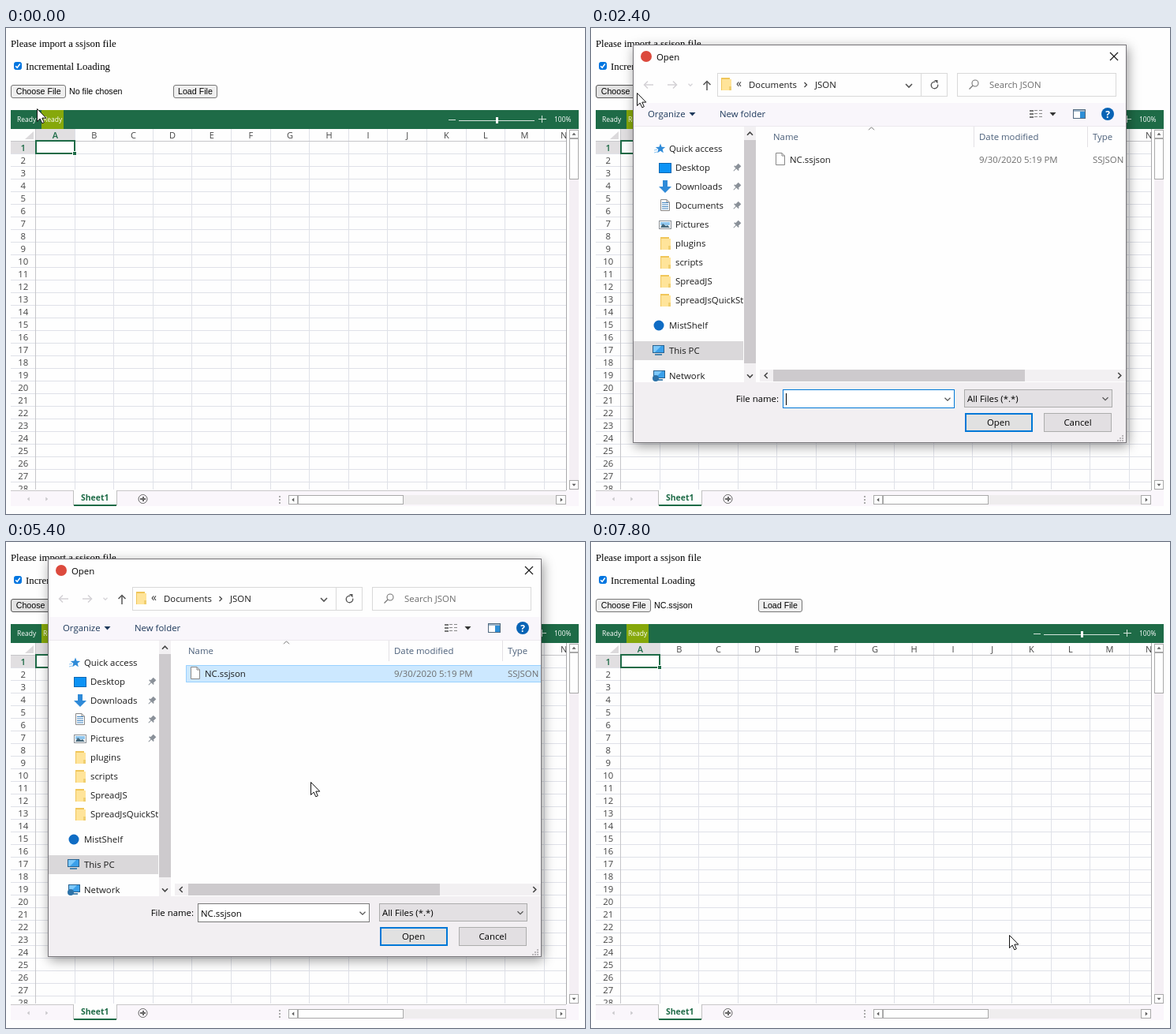
Animation of 734 by 616 pixels, one loop 8000 ms. Source, as an HTML page with a canvas:

```html
<!DOCTYPE html>
<html lang="en">
<head>
<meta charset="utf-8">
<title>Import a file</title>
<style>
html, body { margin: 0; width: 100%; height: 100%; overflow: hidden; background: #fefefe; }
canvas { display: block; }
</style>
</head>
<body>
<canvas id="stage" width="734" height="616"></canvas>
<script>
const ctx = document.getElementById('stage').getContext('2d');
const LOOP = 8000, STEP = 200;
const UI = '"Open Sans", "Noto Sans", sans-serif';
const ARIAL = '10.67px "Liberation Sans", Arial, sans-serif';
const SERIF = '12.8px "Liberation Serif", "Times New Roman", serif';
const GREEN = '#1e6b47', BLUE = '#0078d7';

// [time, x, y] of the pointer tip
const PATH = [
  [0, 39, 102], [200, 50, 91], [400, 57, 83], [1000, 57, 83], [1400, 58, 82],
  [2600, 58, 82], [3000, 118, 104], [3400, 222, 134], [3600, 247, 139],
  [4000, 264, 165], [4600, 265, 166], [5000, 318, 226], [5400, 386, 304],
  [5800, 456, 396], [6200, 530, 494], [6400, 538, 504], [7400, 538, 504], [7800, 530, 498]
];

function pointerAt(t) {
  const i = PATH.findIndex(p => p[0] > t);
  if (i < 0) return PATH[PATH.length - 1].slice(1);
  const [t0, x0, y0] = PATH[i - 1], [t1, x1, y1] = PATH[i];
  const k = (t - t0) / (t1 - t0);
  return [x0 + (x1 - x0) * k, y0 + (y1 - y0) * k];
}

const inside = ([x, y], l, t, r, b) => x >= l && x < r && y >= t && y < b;

function rect(x, y, w, h, fill, stroke, lw = 1) {
  if (fill) { ctx.fillStyle = fill; ctx.fillRect(x, y, w, h); }
  if (stroke) {
    ctx.strokeStyle = stroke; ctx.lineWidth = lw;
    ctx.strokeRect(x + lw / 2, y + lw / 2, w - lw, h - lw);
  }
}

function round(x, y, w, h, r, fill, stroke) {
  ctx.beginPath();
  ctx.roundRect(x + .5, y + .5, w - 1, h - 1, r);
  ctx.fillStyle = fill; ctx.fill();
  if (stroke) { ctx.strokeStyle = stroke; ctx.lineWidth = 1; ctx.stroke(); }
}

function disc(x, y, r, fill) {
  ctx.beginPath(); ctx.arc(x, y, r, 0, 7);
  ctx.fillStyle = fill; ctx.fill();
}

function trace(pts) {
  ctx.beginPath();
  for (let i = 0; i < pts.length; i += 2) ctx.lineTo(pts[i], pts[i + 1]);
}

function line(color, lw, ...pts) {
  trace(pts);
  ctx.strokeStyle = color; ctx.lineWidth = lw; ctx.stroke();
}

function poly(color, ...pts) {
  trace(pts); ctx.closePath();
  ctx.fillStyle = color; ctx.fill();
}

function text(s, x, y, color = '#1a1a1a', font = 11.4, align = 'left') {
  ctx.font = typeof font === 'number' ? `${font}px ${UI}` : font;
  ctx.fillStyle = color; ctx.textAlign = align;
  ctx.fillText(s, x, y);
}

// direction: 0 down, 1 left, 2 up, 3 right
function turned(x, y, dir, draw) {
  ctx.save(); ctx.translate(x, y); ctx.rotate(dir * Math.PI / 2); draw(); ctx.restore();
}
const chevron = (x, y, dir = 0, c = '#555', r = 4, lw = 1.3) =>
  turned(x, y, dir, () => line(c, lw, -r, -r / 2, 0, r / 2, r, -r / 2));
const wedge = (x, y, dir, c, r = 3) =>
  turned(x, y, dir, () => poly(c, -r, -r / 2, r, -r / 2, 0, r / 2 + .5));
const arrow = (x, y, dir, c) => turned(x, y, dir, () => {
  line(c, 1.5, 0, -6, 0, 5);
  line(c, 1.5, -4.5, 1, 0, 5.5, 4.5, 1);
});

function clipped(x, y, w, h, draw) {
  ctx.save(); ctx.beginPath(); ctx.rect(x, y, w, h); ctx.clip(); draw(); ctx.restore();
}

function form(t, at, open) {
  text('Please import a ssjson file', 6, 24, '#000', SERIF);
  round(10, 43, 10, 10, 2, '#0075e0', '#0075e0');
  line('#fff', 1.6, 12.2, 48.2, 14.2, 50.2, 17.8, 45.6);
  text('Incremental Loading', 25, 53, '#000', SERIF);
  const hot = open || inside(at, 6, 72, 76, 89);
  round(6, 72, 70, 17, 2.5, hot ? '#e3e3e3' : '#efefef', hot ? '#555' : '#767676');
  text('Choose File', 12.7, 84, '#000', ARIAL);
  text(t >= 6800 ? 'NC.ssjson' : 'No file chosen', 80, 84, '#000', ARIAL);
  round(212, 72, 56, 17, 2.5, '#efefef', '#767676');
  text('Load File', 218, 84, '#000', ARIAL);
}

function statusBar() {
  rect(6, 104, 720, 24, GREEN);
  rect(45, 104, 28, 24, '#86a80b');
  text('Ready', 14, 119, '#fff', 8.5);
  text('Ready', 47, 119, '#fff', 8.5);
  rect(561, 116, 9, 1, '#d5e5dc');
  rect(574, 117, 96, 1, '#d5e5dc');
  rect(621, 113, 3, 8, '#fff');
  rect(675, 115, 10, 1, '#d5e5dc');
  rect(679, 111, 1, 9, '#d5e5dc');
  text('100%', 695, 119, '#fff', 8.5);
}

function grid() {
  const line1 = '#dfe1e8';
  rect(6, 144, 31, 15, '#e1dfe1');
  rect(38, 128, 50, 15, '#e1dfe1');
  clipped(6, 128, 704, 457, () => {
    for (let i = 0; i < 14; i++) {
      const x = 37.5 + 49.6 * i;
      if (i) rect(Math.floor(x), 128, 1, 457, line1);
      text(String.fromCharCode(65 + i), x + 24.8, 140, i ? '#444' : GREEN,
        i ? 11 : `600 11px ${UI}`, 'center');
    }
    for (let i = 0; i < 28; i++) {
      rect(6, 159 + 16 * i, 704, 1, line1);
      text(i + 1, 21.8, 156 + 16 * i, i ? '#444' : GREEN, i ? 11.4 : `600 11.4px ${UI}`, 'center');
    }
  });
  rect(6, 143, 704, 1, '#c6c6c9');
  rect(37, 128, 1, 457, '#c6c6c9');
  poly('#dcdadc', 35, 131, 35, 141, 24, 141);
  rect(37, 142, 51, 18, '#fff', GREEN, 2);
  rect(84, 156, 6, 6, '#fff');
  rect(85, 157, 4, 4, GREEN);
  rect(710, 128, 1, 458, '#a9a9ab');
}

function scrollers() {
  const edge = '#a9a9a9', ink = '#606060';
  rect(714, 128, 12, 458, '#f4eff4');
  rect(714, 129, 12, 11, '#fefefe', edge);
  wedge(720, 134.5, 2, ink, 2.5);
  rect(714, 140, 12, 52, '#fefefe', edge);
  rect(714, 573, 12, 12, '#fefefe', edge);
  wedge(720, 579, 0, ink, 2.5);

  rect(6, 586, 720, 20, '#faf6fb');
  rect(6, 586, 704, 1, '#c9c7c9');
  wedge(28.5, 597, 1, '#c9c7cb', 2.5);
  wedge(51.5, 597, 3, '#c9c7cb', 2.5);
  rect(85, 586, 56, 20, '#fefefe');
  rect(85, 586, 1, 19, '#c0c0c0');
  rect(140, 586, 1, 19, '#c0c0c0');
  rect(86, 604, 54, 2, GREEN);
  text('Sheet1', 112.7, 599, GREEN, `bold 10.4px ${UI}`, 'center');
  ctx.beginPath(); ctx.arc(173.5, 597, 5.5, 0, 7);
  ctx.strokeStyle = '#666'; ctx.lineWidth = 1; ctx.stroke();
  rect(170, 596, 7, 2, '#666');
  rect(173, 594, 2, 6, '#666');
  for (let i = 0; i < 3; i++) rect(346, 593 + 4 * i, 2, 2, '#aaa');

  rect(358, 592, 352, 12, '#efedee');
  rect(358, 592, 12, 12, '#fefefe', edge);
  wedge(364, 598, 1, ink, 2.5);
  rect(370, 592, 134, 12, '#fefefe', edge);
  rect(697, 592, 13, 12, '#fefefe', edge);
  wedge(704, 598, 3, ink, 2.5);
}

function folder(x, y, w = 13, h = 16) {
  rect(x, y, w - 2, h, '#f0c65a');
  rect(x + 1, y + 2, w - 1, h - 2, '#ffe49a');
  rect(x + w - 3, y + h - 5, 3, 5, '#f0cf70');
}

function page(x, y, w, h) {
  trace([x + .5, y + .5, x + w - 4, y + .5, x + w - .5, y + 4, x + w - .5, y + h - .5, x + .5, y + h - .5]);
  ctx.closePath();
  ctx.fillStyle = '#fff'; ctx.fill();
  ctx.strokeStyle = '#888'; ctx.lineWidth = 1; ctx.stroke();
  line('#888', 1, x + w - 4, y + .5, x + w - 4, y + 4, x + w - .5, y + 4);
}

function pin(x, y) {
  turned(x, y, .5, () => {
    rect(-2.5, -5, 5, 6, '#8a9199');
    rect(-4, 0, 8, 1.5, '#8a9199');
    rect(-.5, 1, 1, 5, '#8a9199');
  });
}

function monitor(x, y) {
  rect(x, y, 15, 10, '#3aa0ea', '#27618f');
  poly('#7cc8fa', x + 1, y + 1, x + 11, y + 1, x + 3, y + 9, x + 1, y + 9);
  rect(x + 3, y + 11, 9, 2, '#4b86b0');
}

const ICONS = {
  star(y) {
    const pts = [];
    for (let i = 0; i < 10; i++) {
      const a = -Math.PI / 2 + i * Math.PI / 5, r = i % 2 ? 2.8 : 6.5;
      pts.push(88 + r * Math.cos(a), y + r * Math.sin(a));
    }
    poly('#2f8bd8', ...pts);
    line('#8cc4f0', 1, 80, y + 2, 84, y + 1);
    line('#8cc4f0', 1, 80, y + 5, 84, y + 4);
  },
  desk(y) { rect(86, y - 6, 16, 13, '#0c93f5', '#0b67b2'); },
  down(y) { poly('#2e8ad8', 91, y - 8, 97, y - 8, 97, y, 102, y, 94, y + 8, 86, y, 91, y); },
  doc(y) {
    page(88, y - 8, 12, 15);
    for (let i = 0; i < 4; i++) rect(90, y - 4 + i * 2.5, 8, 1, '#3a80bd');
  },
  pic(y) {
    rect(86, y - 5, 16, 11, '#fff', '#8a9096');
    rect(88, y - 3, 12, 4, '#8fc6ee');
    poly('#45687b', 88, y + 4, 91, y - 1, 95, y + 2, 97, y + 1, 100, y + 4);
  },
  folder(y) { folder(88, y - 8); },
  cloud(y) { disc(86, y, 6.5, '#0f6cc4'); },
  pc(y) { monitor(78, y - 7); },
  net(y) { monitor(79, y - 7); disc(82, y + 3, 4, '#2c72a8'); }
};

const PLACES = [
  ['Quick access', 'star', 153], ['Desktop', 'desk', 177], ['Downloads', 'down', 201],
  ['Documents', 'doc', 225], ['Pictures', 'pic', 249], ['plugins', 'folder', 273],
  ['scripts', 'folder', 297], ['SpreadJS', 'folder', 321], ['SpreadJsQuickStart', 'folder', 345],
  ['MistShelf', 'cloud', 377], ['This PC', 'pc', 409], ['Network', 'net', 441]
];

function navigation() {
  disc(70, 36, 7, '#dc4a3d');
  text('Open', 83, 41, '#000');
  line('#222', 1.2, 658, 31, 668, 41);
  line('#222', 1.2, 668, 31, 658, 41);

  arrow(73, 72, 1, '#d3d1d5');
  arrow(103, 72, 3, '#d3d1d5');
  chevron(126, 72, 0, '#d6d4d8', 2.5);
  arrow(147, 73, 2, '#555');
  rect(160, 57, 292, 30, '#fefefe', '#d9d9d9');
  rect(418, 57, 1, 30, '#d9d9d9');
  folder(165, 63);
  text('«', 184, 75, '#333', 14);
  text('Documents', 200, 76);
  chevron(272, 72, 3, '#444', 3);
  text('JSON', 284, 76);
  chevron(403, 73, 0, '#555', 4, 1.6);
  ctx.beginPath(); ctx.arc(435.5, 72.5, 4.2, -.2, 4.9);
  ctx.strokeStyle = '#555'; ctx.lineWidth = 1.4; ctx.stroke();
  poly('#555', 435, 66, 439.5, 66, 439.5, 70.5);
  rect(464, 57, 202, 30, '#fefefe', '#d9d9d9');
  ctx.beginPath(); ctx.arc(487, 70, 4, 0, 7);
  ctx.strokeStyle = '#777'; ctx.lineWidth = 1.1; ctx.stroke();
  line('#777', 1.2, 484, 73, 479.5, 77.5);
  text('Search JSON', 505, 76, '#6d6d6d');

  rect(54, 95, 624, 29, '#f9f6fb');
  rect(54, 124, 624, 1, '#ece9ee');
  text('Organize', 72, 113, '#1e395b');
  wedge(128.5, 109, 0, '#1e395b', 4);
  text('New folder', 163, 113, '#1e395b');
  for (let i = 0; i < 3; i++) {
    const y = 104 + 4 * i;
    rect(556, y, 5, 2, '#777');
    rect(562, y, 4, 1, '#888');
    rect(568, y, 4, 1, '#888');
  }
  wedge(585.5, 109, 0, '#333', 4);
  rect(611, 103, 16, 12, '#fff', '#51697f');
  rect(612, 104, 14, 2, '#9db4c8');
  rect(620, 106, 6, 8, '#2d8ed6');
  disc(655, 109, 8, '#0863b5');
  text('?', 655, 113.5, '#fff', `bold 12px ${UI}`, 'center');
}

function sidebar() {
  clipped(54, 125, 139, 324, () => {
    rect(54, 397, 139, 24, '#dad8da');
    PLACES.forEach(([name, icon, y], i) => {
      ICONS[icon](y);
      text(name, i && i < 9 ? 107 : 99, y + 4);
      if (i && i < 5) pin(185, y);
    });
  });
  rect(194, 125, 15, 324, '#f2f0f2');
  rect(194, 142, 15, 283, '#cdcacd');
  chevron(201.5, 134, 2, '#444', 3.5, 1.6);
  chevron(201.5, 441, 0, '#444', 3.5, 1.6);
}

function fileList(t, at) {
  const head = '#4c607a';
  if (inside(at, 214, 125, 485, 151)) {
    rect(214, 125, 271, 26, '#d9ebf9');
    rect(470, 125, 1, 26, '#b5d6ee');
    chevron(477, 137, 0, '#555', 3, 1);
  }
  rect(485, 125, 1, 26, '#e3e1e5');
  rect(629, 125, 1, 26, '#e3e1e5');
  chevron(355.5, 127.5, 2, '#777', 3.5, 1);
  text('Name', 231, 142, head);
  text('Date modified', 492, 142, head);
  text('Type', 636, 142, head);

  if (t >= 6600) rect(228, 156, 450, 22, '#d9d7d9');
  else if (t >= 4200) {
    rect(228, 156, 450, 22, '#cce8ff');
    line('#99d1ff', 1, 678, 156.5, 228.5, 156.5, 228.5, 177.5, 678, 177.5);
  } else if (inside(at, 228, 156, 678, 178)) rect(228, 156, 450, 22, '#e5f3ff');
  page(234, 158, 12, 16);
  text('NC.ssjson', 252, 171);
  text('9/30/2020 5:19 PM', 492, 171, '#6d6d6d');
  clipped(630, 156, 46, 22, () => text('SSJSON File', 636, 171, '#6d6d6d'));

  rect(214, 433, 464, 15, '#f2f0f2');
  rect(231, 433, 319, 15, '#cdcacd');
  chevron(222, 440.5, 1, '#444', 3.5, 1.6);
  chevron(670, 440.5, 3, '#444', 3.5, 1.6);
}

function footer(t, at) {
  const picked = t >= 4200;
  rect(54, 449, 624, 76, '#f2eff2');
  text('File name:', 238, 474, '#000', 11.4, 'right');
  rect(243, 458, 218, 24, '#fff', picked ? '#7a7a7a' : BLUE);
  if (picked) text('NC.ssjson', 247, 475, '#000');
  else if ((t - 2200) % 1060 < 530) rect(247, 463, 1, 15, '#000');
  chevron(452, 470.5, 0, '#555', 3.5, 1.2);
  rect(473, 458, 188, 23, '#e3e0e3', '#acacac');
  text('All Files (*.*)', 477, 474, '#000');
  chevron(652, 470, 0, '#555', 3.5, 1.2);
  const hot = inside(at, 474, 488, 560, 512), down = t >= 6600;
  rect(474, 488, 86, 24, down ? '#cce4f7' : hot ? '#e5f1fb' : '#e1e1e1', hot ? '#0068b8' : BLUE, hot ? 1 : 2);
  text('Open', 516.5, 504, '#000', 11.4, 'center');
  rect(574, 488, 86, 24, '#e2dfe2', '#adadad');
  text('Cancel', 617, 504, '#000', 11.4, 'center');
  for (let i = 0; i < 3; i++)
    for (let j = 0; j <= i; j++) rect(673 - 3 * j, 516 + 3 * i, 2, 2, '#bbb8bb');
}

function dialog(t, at) {
  ctx.save();
  ctx.shadowColor = 'rgba(0,0,0,.4)'; ctx.shadowBlur = 14; ctx.shadowOffsetY = 4; ctx.shadowOffsetX = 2;
  rect(53, 21, 626, 505, '#fefefe');
  ctx.restore();
  navigation();
  sidebar();
  fileList(t, at);
  footer(t, at);
  rect(53, 21, 626, 505, null, '#77757a');
}

function busyRing(x, y, t) {
  const a = t / 160;
  disc(x, y, 8, '#1c85d6');
  ctx.beginPath(); ctx.arc(x, y, 6, a, a + 1.6);
  ctx.strokeStyle = '#63b4ee'; ctx.lineWidth = 2.5; ctx.stroke();
  disc(x, y, 4, '#e8f2fa');
}

function pointer([x, y]) {
  ctx.save(); ctx.translate(x + .5, y + .5);
  trace([0, 0, 0, 16, 3.7, 12.6, 6.3, 18.3, 8.8, 17.2, 6.3, 11.6, 11.3, 11.6]);
  ctx.closePath();
  ctx.fillStyle = '#fff'; ctx.fill();
  ctx.strokeStyle = '#111'; ctx.lineWidth = 1; ctx.stroke();
  ctx.restore();
}

function draw(t) {
  const at = pointerAt(t), open = t >= 2200 && t < 6800;
  rect(0, 0, 734, 616, '#fefefe');
  form(t, at, open);
  statusBar();
  grid();
  scrollers();
  if (open) dialog(t, at);
  if (t >= 1600 && t < 2200) busyRing(at[0] + 14, at[1], t);
  pointer(at);
}

function tick(now) {
  draw(Math.floor(now % LOOP / STEP) * STEP);
  requestAnimationFrame(tick);
}
draw(0);
requestAnimationFrame(tick);
</script>
</body>
</html>
```
